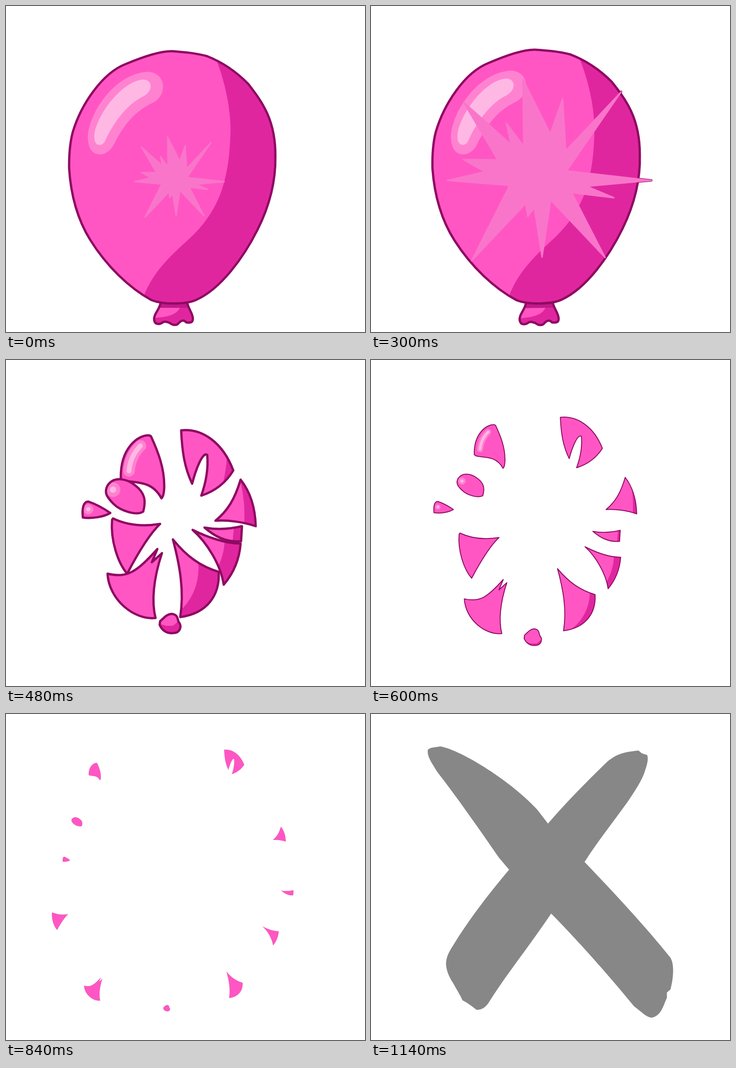
These frames come from a looping animation (785x714 px, 1200 ms). An HTML page with a canvas:

```html
<!DOCTYPE html>
<html lang="en">
<head>
<meta charset="utf-8">
<title>Balloon pop</title>
<style>
html, body { margin: 0; width: 100%; height: 100%; overflow: hidden; background: #fff; }
canvas { display: block; width: 785px; height: 714px; }
</style>
</head>
<body>
<canvas id="stage" width="785" height="714"></canvas>
<script>
const ctx = document.getElementById('stage').getContext('2d');
const LOOP = 1200, STEP = 60;
const PINK = '#ff56c3', SHADE = '#e0269f', LINE = '#8f0a62';
const GLOW = '#ff82d0', PALE = '#ffb8e4', FLASH = '#f975ca', GRAY = '#878787';
const P = d => new Path2D(d);
const mix = (a, b, k) => a + (b - a) * k;

const body = P('M364 99C340 98 300 111 262 127C210 147 164 216 146 276C137 310 138 350 138 355C142 420 158 470 184 512C220 570 270 618 318 644C345 655 395 653 415 644C470 620 520 550 550 490C575 440 590 385 589 330C590 250 560 210 530 171C500 140 470 122 440 110C415 103 390 101 364 99Z');
const bodyShade = P('M460 118C480 170 491 225 491 272C490 310 487 350 477 385C465 435 435 480 395 515C345 560 320 590 303 631L303 665H605V95Z');
const glowOuter = P('M179 290C178 240 235 148 310 144C348 145 355 190 325 210C285 228 260 255 235 305C220 333 180 335 179 290Z');
const glowInner = P('M193 285C195 245 250 165 300 161C322 162 322 187 300 198C265 215 235 255 217 295C210 310 192 308 193 285Z');
const knot = P('M338 650C336 665 322 675 324 688C326 700 338 697 344 692C352 690 352 693 358 694C365 700 374 700 378 694C385 687 390 688 394 693C408 695 410 690 408 680C405 668 400 665 396 650Z');
const knotLight = P('M336 661H380C374 675 355 682 322 683Z');
const knotBand = P('M330 645H402V661H330Z');
const star = P('M332 160L392 280 419 203 426 317 547 188 428 361 613 382 472 395 531 420 439 409 512 551 393 425 374 550 357 442 343 461 338 433 220 558 303 393 167 382 249 363 201 336 277 337 202 210 306 303 296 257 334 307Z');
const cross = P('M124 80C126 73 140 73 152 71C200 80 310 150 364 210L387 240C430 190 480 140 515 106C540 84 560 83 585 80L592 86 604 90C607 100 604 110 598 128C592 145 580 165 560 194C530 236 495 280 467 324C530 390 600 465 655 534C664 550 661 580 655 603L647 610V622C640 635 636 660 615 665C603 665 595 655 575 640C530 585 470 515 394 437C345 510 300 565 260 628C250 645 240 648 231 648C218 638 210 632 200 627C195 615 185 600 180 590C170 575 164 560 164 545C166 525 175 515 185 498C225 435 265 385 302 341L280 315C235 250 190 185 145 127C135 110 123 95 124 80Z');

// Boxes are x y w h at 480, 600 and 720 ms; shade slides out by `slide` per 120 ms.
const shards = [
  { d: 'M313 165C290 163 250 192 251 258Q252 262 258 264C282 270 318 262 340 303Q346 297 346 275C346 235 332 200 317 167Z',
    boxes: ['250 164 96 140', '225 141 68 97', '198 119 47 68'],
    glow: 'M294 188Q272 210 269 243', size: 25 },
  { d: 'M222 275C235 255 262 258 283 275C305 292 306 310 300 332C285 342 250 330 235 315C220 300 214 290 222 275Z',
    boxes: ['217 261 88 77', '187 250 61 51', '160 235 43 36'],
    glow: 'M234 284h.1', size: 32 },
  { d: 'M180 310C169 310 166 325 168 345C190 348 215 343 228 335C212 324 195 315 180 310Z',
    boxes: ['167 309 62 38', '137 309 44 27', '129 310 29 20'],
    glow: 'M180 327h.1', size: 22 },
  { d: 'M234 347C265 362 300 365 337 359C315 380 290 420 265 468C245 445 228 395 232 350Z',
    boxes: ['230 347 107 121', '191 379 89 99', '120 413 63 67'], drift: .6 },
  { d: 'M222 468C265 478 285 465 331 414L319 443 341 423C322 480 318 530 327 565C280 570 225 525 222 468Z',
    boxes: ['222 413 119 153', '204 480 93 120', '181 531 70 90'] },
  { d: 'M337 572C345 566 350 557 362 556C374 557 375 564 377 573C386 582 381 598 366 598C350 600 340 590 336 580Z',
    boxes: ['335 555 48 44', '334 588 40 38', '339 616 27 25'],
    shade: 'M320 573L350 582H365L375 574 395 560V610H320Z', slide: [4, 11] },
  { d: 'M365 393C395 430 425 452 465 464C468 515 440 555 381 563C390 505 380 450 365 393Z',
    boxes: ['364 393 101 170', '407 457 83 136', '447 514 62 101'],
    shade: 'M419 430C428 490 405 540 350 572L530 600V430Z', slide: [30, 2] },
  { d: 'M408 372C440 388 480 402 513 402C510 440 495 470 476 492C470 450 440 400 408 372Z',
    boxes: ['408 372 105 120', '468 409 78 92', '518 437 61 72'],
    shade: 'M478 380C480 425 466 450 450 480L480 520 560 500V380Z', slide: [15, 5] },
  { d: 'M434 367C460 372 490 370 516 364L514 397C480 400 455 385 434 367Z',
    boxes: ['434 364 82 34', '485 373 60 25', '550 379 46 20'],
    shade: 'M499 358L495 404H530V358Z', slide: [11, 0] },
  { d: 'M513 262C535 290 545 325 546 364C520 355 485 350 458 352C485 330 500 305 513 262Z',
    boxes: ['458 262 88 102', '514 257 67 80', '552 249 49 57'],
    shade: 'M509 250C519 290 524 325 520 370H580V250Z', slide: [14, 0] },
  { d: 'M383 154C428 149 474 180 497 242C480 270 455 288 427 297C440 260 442 230 440 208C430 200 415 240 407 271C390 235 385 200 383 154Z',
    boxes: ['383 152 114 145', '414 124 92 112', '444 89 77 95'],
    shade: 'M483 195C484 230 478 255 470 290H520V195Z', slide: [20, 0] }
];

for (const s of shards) {
  s.path = P(s.d);
  // Centre plus size makes the final drift and shrink easy to extend.
  s.keys = s.boxes.map(b => {
    const [x, y, w, h] = b.split(' ').map(Number);
    return [x + w / 2, y + h / 2, w, h];
  });
  const [, a, b] = s.keys, k = s.drift || 1.1;
  s.keys.push([mix(b[0], a[0], -k), mix(b[1], a[1], -k), b[2] * .35, b[3] * .35]);
}

function fill(path, color) {
  ctx.fillStyle = color;
  ctx.fill(path);
}

function stroke(path, color, width) {
  if (width <= 0) return;
  ctx.strokeStyle = color;
  ctx.lineWidth = width;
  ctx.stroke(path);
}

function clipped(path, draw) {
  ctx.save();
  ctx.clip(path);
  draw();
  ctx.restore();
}

function scaleAbout(x, y, scale) {
  ctx.translate(x, y);
  ctx.scale(scale, scale);
  ctx.translate(-x, -y);
}

function drawStar(scale, color, width) {
  ctx.save();
  scaleAbout(370.4, 387, scale);
  stroke(star, color, width / scale);
  fill(star, color);
  ctx.restore();
}

function drawBalloon(p) {
  ctx.save();
  ctx.translate(365, 560);
  ctx.rotate(-.011 * p);
  ctx.translate(-365, -560);
  scaleAbout(365, 650, 1 + .006 * p);
  fill(knot, SHADE);
  clipped(knot, () => {
    fill(knotLight, PINK);
    fill(knotBand, '#c01a88');
  });
  stroke(knot, LINE, 5);
  fill(body, PINK);
  clipped(body, () => fill(bodyShade, SHADE));
  fill(glowOuter, GLOW);
  fill(glowInner, PALE);
  stroke(body, LINE, 5);
  ctx.restore();
}

function drawShard(s, i, k, age) {
  const [cx, cy, w, h] = s.keys[i].map((v, n) => mix(v, s.keys[i + 1][n], k));
  const [ox, oy, ow, oh] = s.keys[0];
  const sx = w / ow, sy = h / oh;
  const path = new Path2D();
  path.addPath(s.path, new DOMMatrix([sx, 0, 0, sy, cx - ox * sx, cy - oy * sy]));
  fill(path, PINK);
  if (age < 2) clipped(path, () => {
    ctx.translate(cx, cy);
    ctx.scale(sx, sy);
    ctx.translate(-ox, -oy);
    if (s.glow) {
      const size = s.size * (1 - age * age / 4);
      stroke(P(s.glow), GLOW, size);
      stroke(P(s.glow), PALE, size * .42);
    }
    if (s.shade) {
      ctx.translate(s.slide[0] * age, s.slide[1] * age);
      fill(P(s.shade), SHADE);
    }
  });
  const widths = [5, 2, .6, 0];
  stroke(path, LINE, mix(widths[i], widths[i + 1], k));
}

function drawShards(t) {
  const age = (t - 480) / 120;
  const i = Math.min(2, Math.floor(age));
  const k = i < 2 ? age - i : (t - 720) / 180;
  for (const s of shards) drawShard(s, i, k, age);
}

function render(time) {
  const t = Math.floor(time % LOOP / STEP) * STEP;
  ctx.fillStyle = '#fff';
  ctx.fillRect(0, 0, 785, 714);
  ctx.lineJoin = ctx.lineCap = 'round';
  if (t < 480) {
    const p = t / 300;
    const burst = Math.max(0, t - 300) / 120;
    const scale = mix(.44, 1, Math.min(1, p)) + .45 * burst + .22 * burst * burst;
    drawStar(scale, LINE, 5);
    drawBalloon(Math.min(1, p));
    drawStar(scale, FLASH, 3);
  } else if (t < 960) {
    drawShards(t);
  } else if (t >= 1140) {
    fill(cross, GRAY);
  }
}

const start = performance.now();
function tick() {
  render(performance.now() - start);
  requestAnimationFrame(tick);
}
tick();
</script>
</body>
</html>
```
